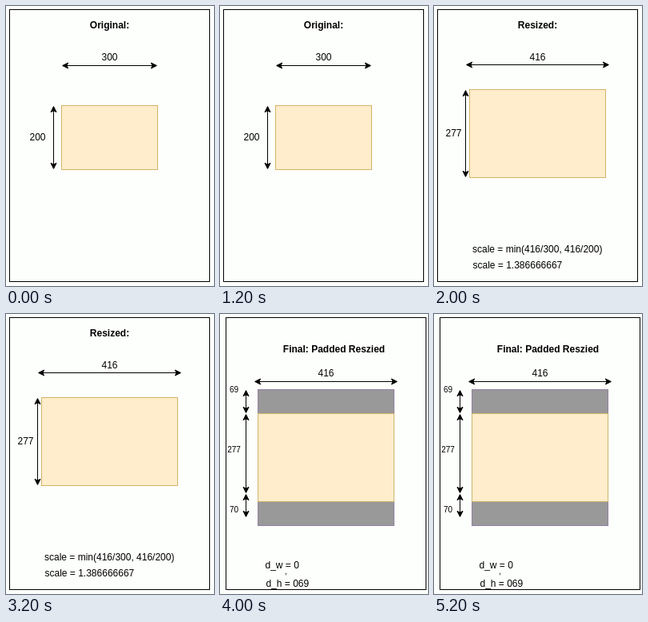
An HTML page for the animation above (6000 ms loop, 260 by 350 pixels).

```html
<!DOCTYPE html>
<html lang="en">
<head>
<meta charset="utf-8">
<title>Resize and pad</title>
<style>
  html, body { margin: 0; width: 100%; height: 100%; overflow: hidden; background: #fdfffc; }
  svg { display: block; width: 260px; height: 350px; }
  text { font: 12px "Liberation Sans", Arial, sans-serif; fill: #000; text-anchor: middle; }
  .bold { font-weight: bold; }
  .small { font-size: 10px; }
  .left { text-anchor: start; }
  .page { fill: none; stroke: #000; }
  .image { fill: #ffedcb; stroke: #d0b468; }
  .pad { fill: #999; stroke: #9580a0; }
  .arrow { fill: #000; stroke: #000; stroke-miterlimit: 10; }
</style>
</head>
<body>
<svg viewBox="0 0 260 350"></svg>
<script>
const svg = document.querySelector('svg');
const STEP = 2000;

function add(parent, tag, attrs = {}, text = '') {
  const el = document.createElementNS('http://www.w3.org/2000/svg', tag);
  for (const key in attrs) el.setAttribute(key, attrs[key]);
  el.textContent = text;
  return parent.appendChild(el);
}

const label = (x, y, text, cls = '') => g => add(g, 'text', { x, y, class: cls }, text);

// Boxes sit on half pixels so that their borders stay crisp.
const box = (cls, x, y, width, height) => g =>
  add(g, 'rect', { x: x + .5, y: y + .5, width, height, class: cls });

// A double-headed arrow of the given length, turned 90 degrees if vertical.
const arrow = (x, y, length, vertical) => g => {
  const a = 1.12, b = length - a;
  const head = (tip, s) =>
    `M${tip} 0L${tip + 7 * s} -3.5L${tip + 5.25 * s} 0L${tip + 7 * s} 3.5Z`;
  add(g, 'path', {
    class: 'arrow',
    transform: `translate(${x + .5} ${y + .5}) rotate(${vertical ? 90 : 0})`,
    d: `M${a + 5.25} 0H${b - 5.25}` + head(a, 1) + head(b, -1)
  });
};

const scenes = [
  [
    box('page', 4, 4, 250, 340),
    label(129.5, 28, 'Original:', 'bold'),
    label(129.5, 68, '300'),
    arrow(69, 74, 120),
    box('image', 69, 124, 120, 80),
    arrow(59, 124, 80, true),
    label(39.5, 168, '200')
  ],
  [
    box('page', 4, 4, 250, 340),
    label(129.5, 28, 'Resized:', 'bold'),
    label(129.5, 68, '416'),
    arrow(39, 73, 180),
    box('image', 44, 104, 170, 110),
    arrow(39, 104, 110, true),
    label(24.5, 163, '277'),
    label(48, 308, 'scale = min(416/300, 416/200)', 'left'),
    label(48.5, 328, 'scale = 1.386666667', 'left')
  ],
  [
    box('page', 7, 4, 250, 340),
    label(142.5, 48, 'Final: Padded Reszied', 'bold'),
    label(132.5, 78, '416'),
    arrow(42, 84, 180),
    box('pad', 47, 94, 170, 170),
    box('image', 47, 124, 170, 110),
    arrow(32, 94, 30, true),
    arrow(32, 124, 100, true),
    arrow(32, 224, 30, true),
    label(17.5, 98, '69', 'small'),
    label(17.5, 173, '277', 'small'),
    label(17.5, 248, '70', 'small'),
    label(56.5, 318, 'd_w = 0', 'left'),
    label(82.5, 325, ',', 'small'),
    label(57.5, 341, 'd_h = 069', 'left')
  ]
];

const groups = scenes.map(parts => {
  const g = add(svg, 'g');
  parts.forEach(draw => draw(g));
  return g;
});

const start = performance.now();
function tick() {
  const current = Math.floor((performance.now() - start) / STEP) % groups.length;
  groups.forEach((g, i) => { g.style.display = i === current ? '' : 'none'; });
  requestAnimationFrame(tick);
}
tick();
</script>
</body>
</html>
```
